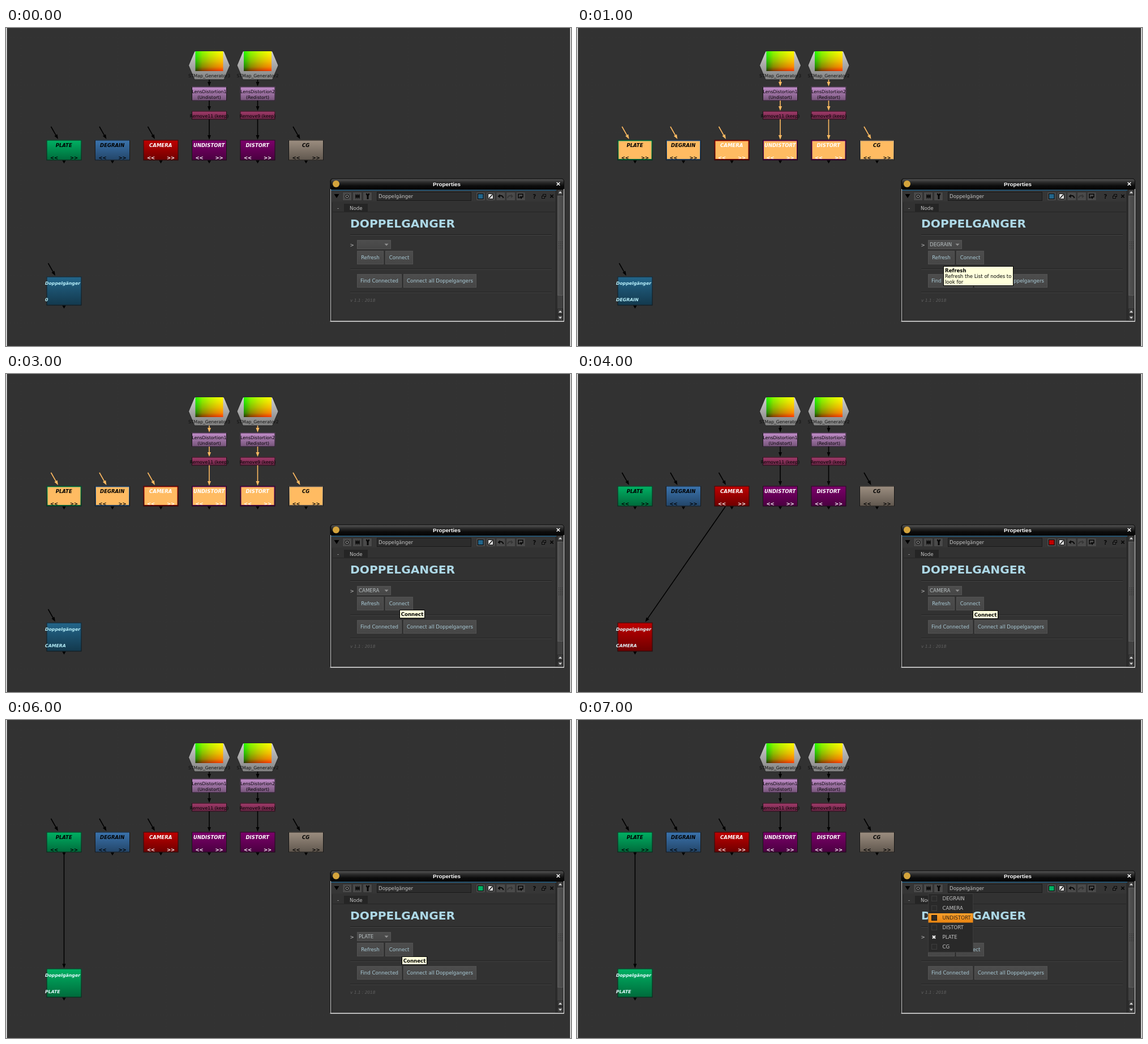
Recreate the animation shown at these times as an HTML page with a canvas. Size 998x561 px, loop 8000 ms.

```html
<!DOCTYPE html>
<html lang="en">
<head>
<meta charset="utf-8">
<title>Node graph</title>
<style>
html, body { margin: 0; width: 100%; height: 100%; overflow: hidden; background: #fff; }
canvas { display: block; }
</style>
</head>
<body>
<canvas id="stage" width="998" height="561"></canvas>
<script>
const ctx = document.getElementById('stage').getContext('2d');
const SANS = '"DejaVu Sans", sans-serif';
const UI = '8.65px ' + SANS;
const LABEL = 'bold italic 8.5px ' + SANS;
const SMALL = '7.75px ' + SANS;
const ORANGE = '#ffbb62', PALE = '#a9cad6', GREY = '#c4c4c4';

const NODES = [
  { name: 'PLATE', top: '#00b163', bottom: '#006a3b', ink: '#000' },
  { name: 'DEGRAIN', top: '#3b74ae', bottom: '#234568', ink: '#000' },
  { name: 'CAMERA', top: '#c00000', bottom: '#6e0000', ink: '#fff' },
  { name: 'UNDISTORT', top: '#7d006b', bottom: '#4a0040', ink: '#fff' },
  { name: 'DISTORT', top: '#7d006b', bottom: '#4a0040', ink: '#fff' },
  { name: 'CG', top: '#9c8e80', bottom: '#60574e', ink: '#000' }
];
NODES.forEach((node, i) => node.x = 102.5 + i * 85.5);
const IDLE = { top: '#23658a', bottom: '#13394d' };
const MENU = ['DEGRAIN', 'CAMERA', 'UNDISTORT', 'DISTORT', 'PLATE', 'CG'];

// One step per second.
const STEPS = [
  { pick: '' },
  { pick: 'DEGRAIN', selected: true, help: true },
  { pick: 'DEGRAIN', selected: true, hover: 'CAMERA' },
  { pick: 'CAMERA', selected: true, tip: [695, 416] },
  { pick: 'CAMERA', linked: true, tip: [699, 417] },
  { pick: 'CAMERA', linked: true, hover: 'PLATE' },
  { pick: 'PLATE', linked: true, tip: [699, 417] },
  { pick: 'PLATE', linked: true, hover: 'UNDISTORT' }
];

function box(x, y, w, h, fill, stroke) {
  ctx.fillStyle = fill;
  ctx.fillRect(x, y, w, h);
  if (stroke) {
    ctx.strokeStyle = stroke;
    ctx.lineWidth = 1;
    ctx.strokeRect(x + 0.5, y + 0.5, w - 1, h - 1);
  }
}

function text(str, x, y, font, color, align = 'left') {
  ctx.font = font;
  ctx.fillStyle = color;
  ctx.textAlign = align;
  ctx.textBaseline = 'alphabetic';
  ctx.fillText(str, x, y);
}

function shape(points, fill, stroke) {
  ctx.beginPath();
  points.forEach(([x, y]) => ctx.lineTo(x, y));
  ctx.closePath();
  ctx.fillStyle = fill;
  ctx.fill();
  if (stroke) {
    ctx.strokeStyle = stroke;
    ctx.lineWidth = 0.8;
    ctx.stroke();
  }
}

function line(x1, y1, x2, y2, color, width = 1) {
  ctx.beginPath();
  ctx.moveTo(x1, y1);
  ctx.lineTo(x2, y2);
  ctx.strokeStyle = color;
  ctx.lineWidth = width;
  ctx.stroke();
}

function fade(x1, y1, x2, y2, ...colors) {
  const g = ctx.createLinearGradient(x1, y1, x2, y2);
  colors.forEach((c, i) => g.addColorStop(i / (colors.length - 1), c));
  return g;
}

function triangle(x, y, w, h, color) {
  shape([[x - w / 2, y], [x + w / 2, y], [x, y + h]], color);
}

function arrow(x1, y1, x2, y2, color) {
  const a = Math.atan2(y2 - y1, x2 - x1), c = Math.cos(a), s = Math.sin(a);
  line(x1, y1, x2 - 5 * c, y2 - 5 * s, color, 1.6);
  shape([[x2, y2], [x2 - 8 * c + 3 * s, y2 - 8 * s - 3 * c],
    [x2 - 8 * c - 3 * s, y2 - 8 * s + 3 * c]], color);
}

function drawBackdrop() {
  box(0, 0, 998, 561, '#fff');
  box(1.5, 0, 995, 561, '#323232');
  ctx.setLineDash([1, 5]);
  for (let x = 26.5; x < 996; x += 85.5) line(x, 0, x, 561, '#363636');
  for (let y = 16.5; y < 561; y += 84) line(2, y, 996, y, '#363636');
  ctx.setLineDash([]);
}

// Red grows to the right and green to the top, both gamma encoded.
function drawMap(x, number) {
  shape([[x - 36.5, 66], [x - 26, 41], [x + 26, 41], [x + 36.5, 66], [x + 26, 91], [x - 26, 91]],
    fade(0, 41, 0, 91, '#d0d0d0', '#808080'), '#1c1c1c');
  const ramp = [0.01, 0.25, 0.5, 0.75, 1].map(v => Math.round(255 * v ** (1 / 2.2)));
  const left = x - 24.5;
  box(left, 41, 49, 35, '#000');
  ctx.globalCompositeOperation = 'lighter';
  box(left, 41, 49, 35, fade(left, 0, left + 49, 0, ...ramp.map(v => `rgb(${v},0,0)`)));
  box(left, 41, 49, 35, fade(0, 78, 0, 41, ...ramp.map(v => `rgb(0,${v},0)`)));
  ctx.globalCompositeOperation = 'source-over';
  text('STMap_Generator' + number, x, 87, SMALL, '#101010', 'center');
}

function drawChain(x, number, mode, remove, color) {
  drawMap(x, number);
  arrow(x, 91, x, 103, color);
  box(x - 31, 103.5, 62, 25, fade(0, 104, 0, 128, '#c18dc9', '#755479'), '#1b151c');
  text('LensDistortion' + (number === 3 ? 1 : 2), x, 115, SMALL, '#000', 'center');
  text(`(${mode})`, x, 125, SMALL, '#000', 'center');
  arrow(x, 128, x, 146, color);
  box(x - 31, 146.5, 62, 15, fade(0, 147, 0, 161, '#a33b6b', '#652443'), '#1b1014');
  text(`Remove${remove} (keep)`, x, 158, SMALL, '#000', 'center');
  arrow(x, 161, x, 197, color);
}

function drawNode(node, selected, wire) {
  const { x, name, ink } = node, left = x - 31;
  if (!/DISTORT/.test(name)) arrow(x - 23, 174, x - 10.5, 196, wire);
  triangle(x, 233, 7, 6, '#000');
  box(left, 197.5, 62, 36, fade(0, 198, 0, 233, node.top, node.bottom), '#161616');
  if (selected) box(left + 2, 199.5, 58, 31.5, ORANGE);
  text(name, x - 0.3, 210, LABEL, ink, 'center');
  ctx.save();
  ctx.beginPath();
  ctx.rect(left, 198, 62, selected ? 33 : 35);
  ctx.clip();
  text('<<', left + 6.5, 232, LABEL, ink);
  text('>>', left + 41.5, 232, LABEL, ink);
  ctx.restore();
}

function drawDouble(step, source) {
  const look = step.linked ? source : IDLE;
  const ink = step.linked ? '#e4fbff' : '#b9f1fb';
  const font = 'bold italic 7.8px ' + SANS;
  if (!step.linked) arrow(74.5, 415, 87, 437, '#000');
  else if (step.pick === 'PLATE') arrow(102.5, 233, 102.5, 438, '#000');
  else arrow(262, 234, 120.5, 437.5, '#000');
  triangle(102.5, 489, 7, 6, '#000');
  box(71.5, 438.5, 62, 51, fade(0, 439, 0, 489, look.top, look.bottom), '#161616');
  text('Doppelgänger', 69, 453, font, ink);
  text(step.pick || '0', 69, 482, font, ink);
}

function drawToolbar(swatch) {
  box(575, 288, 395, 18, '#363636');
  [594, 612, 630].forEach(x => box(x, 289, 17, 16, '#4a4a4a', '#303030'));
  triangle(584, 293, 9, 7, '#000');
  ctx.beginPath();
  ctx.arc(602.5, 297, 4, 0, 7);
  ctx.fillStyle = '#101010';
  ctx.fill();
  ctx.beginPath();
  ctx.arc(602.5, 297, 2.4, 0, 7);
  ctx.strokeStyle = '#bbb';
  ctx.lineWidth = 1;
  ctx.stroke();
  box(617, 294.5, 8, 5, '#111');
  [618, 621, 624].forEach(x => line(x, 292.5, x, 301.5, '#111'));
  line(639, 296, 639, 302, '#080808', 3);
  line(636.5, 292, 639, 296, '#080808', 2.4);
  line(641.5, 292, 639, 296, '#080808', 2.4);
  box(655, 289, 167, 16, '#2c2c2c', '#191919');
  text('Doppelgänger', 658, 300, UI, GREY);

  for (let i = 0; i < 5; i++) box(830 + i * 17.7, 289, 17, 16, '#4a4a4a', '#303030');
  box(833, 292, 10.5, 10, swatch, '#050505');
  box(851, 292, 10, 10, '#e4e4e4', '#111');
  line(853, 300.5, 859.5, 293.5, '#111', 1.5);
  const hook = (x, dir, color) => {
    ctx.beginPath();
    ctx.moveTo(x + 5 * dir, 300);
    ctx.quadraticCurveTo(x + 4 * dir, 295, x - 2 * dir, 296);
    ctx.strokeStyle = color;
    ctx.lineWidth = 2;
    ctx.stroke();
    shape([[x - 5 * dir, 297], [x - dir, 293], [x - dir, 300]], color);
  };
  hook(873.5, 1, '#090909');
  hook(891, -1, '#363636');
  ctx.strokeStyle = '#090909';
  ctx.lineWidth = 1.6;
  ctx.beginPath();
  ctx.moveTo(908, 299.5);
  ctx.lineTo(905, 299.5);
  ctx.lineTo(905, 293);
  ctx.lineTo(913, 293);
  ctx.lineTo(913, 299);
  ctx.stroke();
  triangle(910, 297, 6, 5, '#090909');
  text('?', 933.5, 300.5, 'bold 10px ' + SANS, '#080808', 'center');
  box(948, 293, 6, 5, '#3a3a3a', '#080808');
  box(946, 296, 6, 5, '#3a3a3a', '#080808');
  cross(964, 296.7, 2.7, '#080808', 1.6);
}

function cross(x, y, r, color, width) {
  line(x - r, y - r, x + r, y + r, color, width);
  line(x + r, y - r, x - r, y + r, color, width);
}

function drawScrollbar() {
  box(973, 285, 12, 232, '#2a2a2a');
  box(974, 295, 10, 200, '#404040');
  box(974, 285, 10, 10, '#404040', '#2b2b2b');
  shape([[976, 291.5], [982, 291.5], [979, 288]], '#ddd');
  box(974, 296, 10, 176, fade(974, 0, 984, 0, '#565656', '#454545'), '#5c5c5c');
  for (let y = 377; y < 391; y += 3) {
    for (let x = 976; x < 983; x += 3) box(x, y, 1, 1, '#222');
  }
  [495, 506].forEach(y => box(974, y, 10, 10, '#404040', '#2b2b2b'));
  shape([[976, 502], [982, 502], [979, 498.5]], '#ddd');
  triangle(979, 509.5, 6, 3.5, '#ddd');
}

function button(label, x, y, w) {
  box(x, y, w, 24, fade(0, y, 0, y + 24, '#4d4d4d', '#464646'), '#525252');
  text(label, x + w / 2, y + 15.2, UI, PALE, 'center');
}

function drawPanel(step, swatch) {
  ctx.beginPath();
  ctx.roundRect(572.5, 265.5, 413.5, 253, [5, 5, 0, 0]);
  ctx.fillStyle = '#080808';
  ctx.fill();
  ctx.beginPath();
  ctx.roundRect(574, 266.5, 411, 18.5, [4, 4, 0, 0]);
  ctx.fillStyle = fade(0, 266, 0, 285, '#585858', '#2b2b2b', '#0c0c0c', '#050505');
  ctx.fill();
  box(574, 285, 411, 232, '#323232');
  ctx.beginPath();
  ctx.arc(583, 275, 6, 0, 7);
  ctx.fillStyle = '#d4a43c';
  ctx.fill();
  text('Properties', 778.5, 278.5, 'bold 9.9px "Liberation Sans", sans-serif', '#fff', 'center');
  cross(975.5, 275, 2.8, '#fff', 1.5);
  box(574, 285.5, 398, 1.5, '#1f5b80');
  drawToolbar(swatch);

  line(576.5, 308, 576.5, 517, '#282828');
  line(971.5, 287, 971.5, 517, '#202020');
  box(597, 310, 42, 15, '#252525');
  line(577, 324.5, 970, 324.5, '#262626');
  text('-', 586.5, 321, UI, GREY, 'center');
  text('Node', 607, 321, UI, GREY);
  text('DOPPELGANGER', 608, 352, 'bold 20.2px ' + SANS, '#add8e6');
  [364.5, 425, 466].forEach(y => {
    box(608, y - 0.5, 356, 1, '#1e1e1e');
    box(608, y + 0.5, 356, 1, '#434343');
  });
  text('>', 607.5, 385.5, UI, GREY);
  box(620, 374, 60, 16, fade(0, 374, 0, 390, '#4e4e4e', '#464646'), '#545454');
  text(step.pick, 623, 385.3, UI, '#b9c1c3');
  triangle(672, 380.5, 7, 3.8, '#929292');
  button('Refresh', 620, 393, 47);
  button('Connect', 670, 393, 49);
  button('Find Connected', 620, 434, 79);
  button('Connect all Doppelgangers', 702, 434, 129);
  text('v 1.1 : 2018', 608, 482.5, 'italic 7.4px ' + SANS, '#626262');
  drawScrollbar();
  line(572.5, 517.5, 986, 517.5, '#f4f4f4', 1.5);
  line(985.5, 284, 985.5, 518, '#e0e0e0');
  line(573.5, 284, 573.5, 518, '#c8c8c8');
}

function drawMenu(step) {
  // The menu opens with the current choice over the combo box.
  const top = 374 - 17 * MENU.indexOf(step.pick);
  box(620, top, 80, 104, '#292929', '#3b3b3b');
  MENU.forEach((name, i) => {
    const y = top + 9 + 17 * i, hot = name === step.hover;
    if (hot) box(620.5, y - 8, 79, 16.5, fade(0, y - 8, 0, y + 8, '#fb9f2b', '#e98512'));
    if (name === step.pick) cross(630.5, y, 2.5, '#eee', 2.2);
    else box(626, y - 5, 10, 10, hot ? '#322b23' : '#2b2b2b', hot ? '#1d1710' : '#3d3d3d');
    text(name, 645.5, y + 3.3, UI, hot ? '#302416' : GREY);
  });
}

function drawTip(step) {
  const bold = 'bold 8.65px ' + SANS;
  if (step.help) {
    box(647, 420, 124, 35, '#ffffdc', '#000');
    text('Refresh', 650, 431, bold, '#000');
    text('Refresh the List of nodes to', 650, 441, '8.55px ' + SANS, '#000');
    text('look for', 650, 451, '8.55px ' + SANS, '#000');
  } else if (step.tip) {
    const [x, y] = step.tip;
    box(x, y, 45, 15, '#ffffdc', '#000');
    text('Connect', x + 22.5, y + 10.8, bold, '#000', 'center');
  }
}

function draw(step) {
  const source = NODES.find(node => node.name === step.pick);
  const wire = step.selected ? ORANGE : '#000';
  drawBackdrop();
  drawChain(NODES[3].x, 3, 'Undistort', 11, wire);
  drawChain(NODES[4].x, 2, 'Redistort', 9, wire);
  NODES.forEach(node => drawNode(node, step.selected, wire));
  drawDouble(step, source);
  drawPanel(step, step.linked ? source.top : IDLE.top);
  if (step.hover) drawMenu(step);
  drawTip(step);
}

const start = performance.now();
function tick() {
  const t = Math.max(0, performance.now() - start) % 8000;
  draw(STEPS[Math.floor(t / 1000)]);
  requestAnimationFrame(tick);
}
tick();
</script>
</body>
</html>
```
